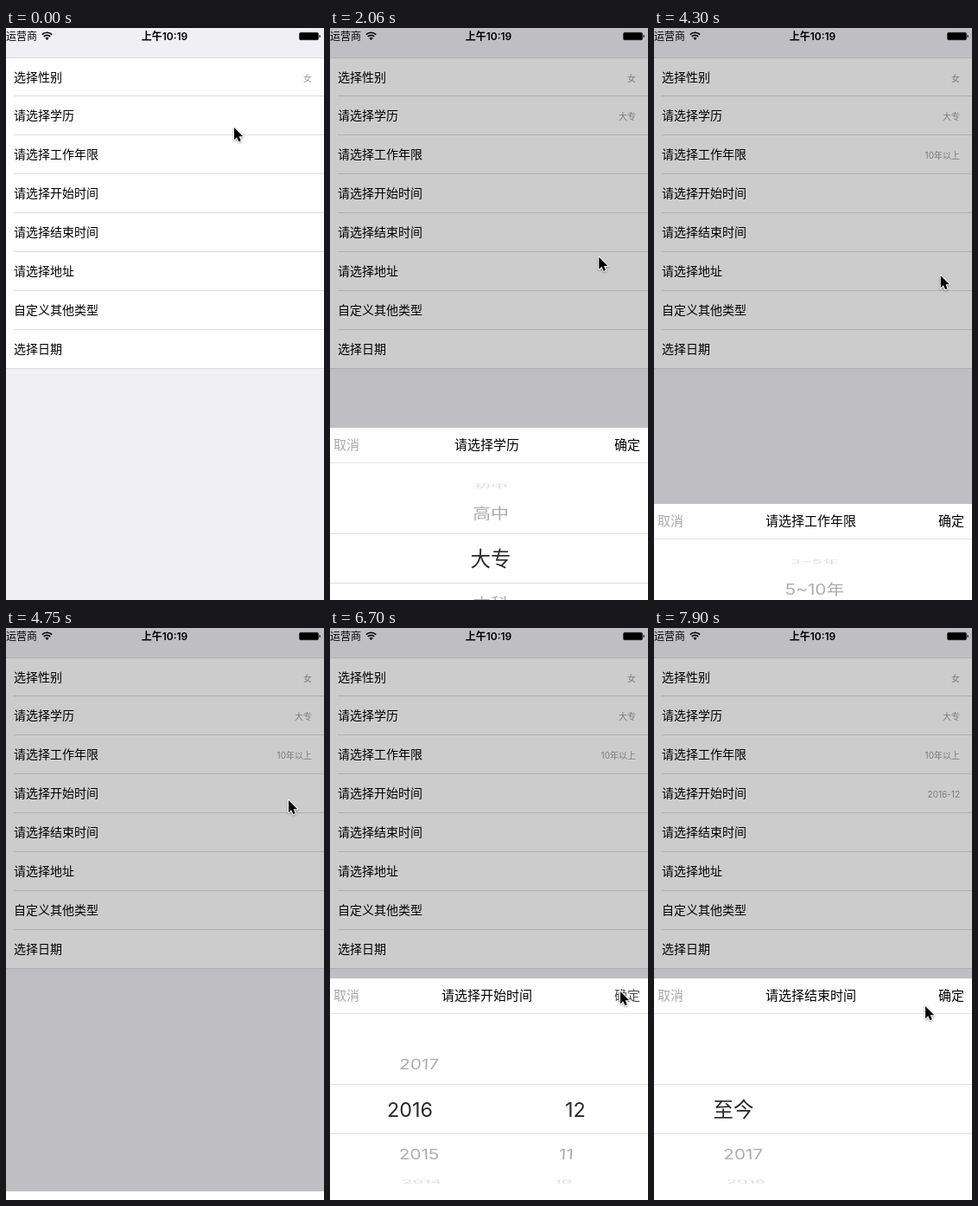
Recreate the animation shown at these times as an HTML page. Size 368 px wide and 661 px high, loop 8000 ms.

```html
<!DOCTYPE html>
<html lang="zh-CN">
<head>
<meta charset="utf-8">
<title>选择器</title>
<style>
html, body { margin: 0; width: 100%; height: 100%; overflow: hidden; background: #efeff4; }
body { font-family: Inter, "Noto Sans CJK SC", "Noto Sans CJK", sans-serif; color: #000; }
#stage { position: absolute; left: 0; top: 0; width: 368px; height: 661px; overflow: hidden; }
#stage div, #stage svg { position: absolute; white-space: nowrap; box-sizing: border-box; }
.status { top: 0; height: 19px; line-height: 19px; font-size: 12px; }
.list { top: 34px; width: 368px; height: 360px; background: #fff; border: solid #dcdcdf; border-width: 1px 0; }
.row { left: 9px; right: 0; height: 45px; line-height: 43px; font-size: 14px; }
.row + .row { border-top: 1px solid #dcdcdf; }
.value { right: 14px; top: 1px; line-height: 44px; font-size: 10px; color: #999; }
#dim { width: 368px; height: 661px; background: rgba(0, 0, 0, .2); }
.sheet { top: 405px; width: 368px; height: 256px; background: #fff; overflow: hidden; }
.head { width: 368px; height: 41px; line-height: 40px; font-size: 15px; border-bottom: 1px solid #e6e6e6; }
.head .title { left: 0; width: 363px; text-align: center; }
.head .cancel { left: 4px; color: #a8a8a8; }
.head .ok { left: 329px; }
.wheel { top: 41px; width: 368px; height: 215px; overflow: hidden; }
.band { top: 122px; width: 368px; height: 58px; background: #fff; overflow: hidden;
  border: solid #e0e0e0; border-width: 1px 0; color: #2a2a2a; }
.item { left: 185.5px; width: 240px; height: 30px; margin: -15px 0 0 -120px; line-height: 30px;
  font-size: 23.4px; text-align: center; }
.wheel .item { top: 110px; }
.band .item { top: 29px; }
#cursor { left: -.7px; top: -1px; width: 20px; height: 24px; overflow: visible; }
</style>
</head>
<body>
<div id="stage">
  <div class="status" style="left:0">运营商</div>
  <svg style="left:41px;top:3px" width="13" height="12" viewBox="0 0 13 12" fill="none" stroke="#000" stroke-width="1.7">
    <path d="M.8 4.6a8.1 8.1 0 0 1 11.4 0M2.8 6.9a5.3 5.3 0 0 1 7.4 0"/>
    <path d="M6.5 11 4.4 8.7a3 3 0 0 1 4.2 0z" fill="#000" stroke="none"/>
  </svg>
  <div class="status" style="left:0;width:367px;text-align:center;font-weight:600">上午10:19</div>
  <svg style="left:338px;top:4px" width="27" height="11" viewBox="0 0 27 11">
    <rect x="1.5" y="1.2" width="22" height="8.6" rx="1.5" stroke="#000" stroke-opacity=".5" stroke-width=".8"/>
    <path d="M24.5 3.8q1.4.4 1.4 1.7t-1.4 1.7z"/>
  </svg>
  <div class="list" id="list"></div>
  <div id="dim"></div>
  <div id="sheets"></div>
  <svg id="cursor" viewBox="0 0 20 24">
    <path d="M0 0V14.2L3.2 11.2 5.4 16.3 7.8 15.2 5.7 10.3H10.2Z" stroke="#fff" stroke-width="2"
      stroke-linejoin="round" paint-order="stroke" style="filter:drop-shadow(0 1px 1px rgba(0,0,0,.35))"/>
  </svg>
</div>
<script>
const LOOP = 8000, SLIDE = 250, HEIGHT = 256, MID = 185.5;
const RADIUS = 88, STEP = 0.632, DEPTH = 0.071, MAGNIFY = 1 / 0.9;
const $ = id => document.getElementById(id);

function add(parent, cls, text = '') {
  const el = document.createElement('div');
  el.className = cls;
  el.textContent = text;
  parent.append(el);
  return el;
}

const countdown = (from, to) => Array.from({ length: from - to + 1 }, (_, i) => String(from - i));
const years = countdown(2017, 2008);

const labels = ['选择性别', '请选择学历', '请选择工作年限', '请选择开始时间',
  '请选择结束时间', '请选择地址', '自定义其他类型', '选择日期'];
const rows = labels.map((label, i) => {
  const el = add($('list'), 'row', label);
  el.style.top = (i ? i * 45 - 2 : 0) + 'px';
  return el;
});
add(rows[0], 'value', '女');

// Each sheet fills the next row; spin is [start, end, selected item]
const sheets = [
  { open: 320, close: 1981, value: '大专', cols: [
    { x: MID, items: ['初中', '高中', '大专', '本科', '硕士', '博士'], spin: [850, 1600, 2] }] },
  { open: 2620, close: 4164, value: '10年以上', cols: [
    { x: MID, items: ['应届毕业生', '1~3年', '3~5年', '5~10年', '10年以上'], spin: [3130, 3950, 4] }] },
  { open: 4720, close: 6780, value: '2016-12', cols: [
    { x: 92, items: years, spin: [5600, 6050, 1] },
    { x: 284, items: countdown(8, 1), to: 6080 },
    { x: 284, items: countdown(12, 1), from: 6080 }] },
  { open: 7220, close: LOOP, value: '', cols: [{ x: 92, items: ['至今', ...years] }] }
];

sheets.forEach((s, i) => {
  s.out = add(rows[i + 1], 'value', s.value);
  s.el = add($('sheets'), 'sheet');
  const head = add(s.el, 'head');
  add(head, 'cancel', '取消');
  add(head, 'title', labels[i + 1]);
  s.ok = add(head, 'ok', '确定');
  const wheel = add(s.el, 'wheel'), band = add(s.el, 'band');
  for (const c of s.cols)
    c.cells = c.items.map(text => [add(wheel, 'item', text), add(band, 'item', text)]);
});

// Pointer stops: time, x, y
const stops = [
  [0, 265, 116], [290, 262, 108], [880, 210, 580], [1330, 206, 520], [1920, 340, 421],
  [2360, 292, 152], [2650, 292, 152], [3100, 212, 546], [3600, 210, 500], [4150, 340, 421],
  [4600, 328, 200], [4750, 328, 200], [5200, 175, 536], [5600, 93, 570], [5950, 95, 517],
  [6700, 337, 421], [7150, 13, 230], [7600, 13, 230], [7750, 100, 563], [7900, 315, 438]
];

const clamp = p => Math.min(1, Math.max(0, p));
const ease = p => { p = clamp(p); return p * p * (3 - 2 * p); };
const easeOut = p => 1 - (1 - clamp(p)) ** 2.3;

function pointer(t) {
  const i = stops.findLastIndex(s => s[0] <= t);
  const [t0, x0, y0] = stops[i], [t1, x1, y1] = stops[i + 1] || [LOOP, x0, y0];
  const p = easeOut((t - t0) / (t1 - t0));
  return [x0 + (x1 - x0) * p, y0 + (y1 - y0) * p];
}

const floorTo = (t, from, step) => from + Math.floor((t - from) / step) * step;
const snap = t => t < 140 ? 0 : t < 2500 ? floorTo(t, 140, 147.5) : floorTo(t, 2500, 150);

// Items lie on a cylinder; the band shows them magnified
function drawColumn({ x, cells, spin, from = 0, to = LOOP }, t) {
  const pos = spin ? spin[2] * ease((t - spin[0]) / (spin[1] - spin[0])) : 0;
  const dx = x - MID;
  cells.forEach(([outer, inner], i) => {
    const a = (i - pos) * STEP, cos = Math.cos(a), sin = Math.sin(a);
    const seen = t >= from && t < to && Math.abs(a) < 1.5;
    outer.style.display = inner.style.display = seen ? '' : 'none';
    if (!seen) return;
    const s = 1 / MAGNIFY - DEPTH * (1 - cos);
    const lean = -dx * DEPTH * sin / RADIUS * s;
    outer.style.transform = `matrix(${s},0,${lean},${s * cos},${dx * s},${RADIUS * sin})`;
    outer.style.opacity = 0.03 + 0.36 * cos;
    inner.style.transform = `matrix(1,0,0,${cos},${dx},${RADIUS * sin * MAGNIFY})`;
  });
}

function draw(t) {
  let dim = false;
  for (const s of sheets) {
    const on = t >= s.open && t < s.close + SLIDE;
    s.out.style.display = t >= s.close ? '' : 'none';
    s.el.style.display = on ? '' : 'none';
    if (!on) continue;
    dim = true;
    const up = ease((t - s.open) / SLIDE) - ease((t - s.close) / SLIDE);
    s.el.style.transform = `translateY(${Math.round(HEIGHT * (1 - up))}px)`;
    s.ok.style.opacity = t > s.close - 90 && t < s.close ? 0.7 : 1;
    s.cols.forEach(c => drawColumn(c, t));
  }
  $('dim').style.display = dim ? '' : 'none';
  const [x, y] = pointer(t);
  $('cursor').style.transform = `translate(${x}px,${y}px)`;
}

const start = performance.now();
function tick() {
  draw(snap((performance.now() - start) % LOOP));
  requestAnimationFrame(tick);
}
tick();
</script>
</body>
</html>
```
